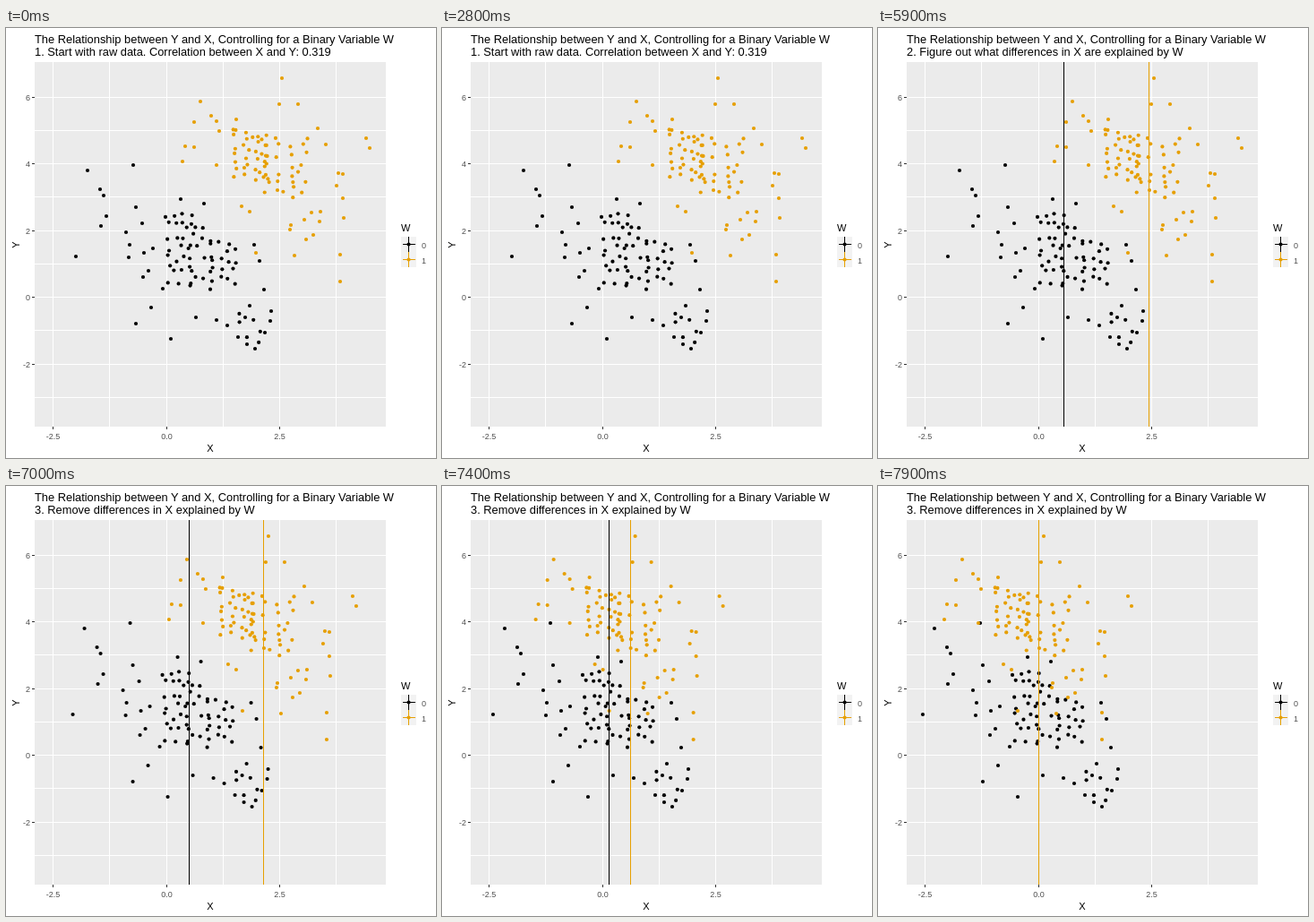
Recreate the animation shown at these times as an HTML page. Size 480 px wide and 480 px high, loop 8 s.

```html
<!DOCTYPE html>
<html lang="en">
<head>
<meta charset="utf-8">
<style>
  html, body { margin: 0; width: 100%; height: 100%; overflow: hidden; background: #fff; }
  svg { display: block; width: 480px; height: 480px; font-family: "Liberation Sans", Arial, sans-serif; }
  .title { font-size: 12.87px; }
  .label { font-size: 11px; }
  .tick { font-size: 9px; fill: #4d4d4d; }
  .mid { text-anchor: middle; }
  .end { text-anchor: end; }
  .line { fill: none; stroke-width: 1; shape-rendering: crispEdges; }
</style>
</head>
<body>
<svg id="plot" viewBox="0 0 480 480"></svg>
<script>
const svg = document.getElementById("plot");
const BLACK = "#000", GOLD = "#e69f00";
const LOOP = 8000, STEP = 100;
const LINES_AT = 4000, MOVE_AT = 6570, MOVE_FOR = 1375;
const CAPTIONS = [
  "1. Start with raw data. Correlation between X and Y: 0.319",
  "2. Figure out what differences in X are explained by W",
  "3. Remove differences in X explained by W"
];

function add(parent, name, attrs, text) {
  const node = document.createElementNS("http://www.w3.org/2000/svg", name);
  for (const key in attrs) node.setAttribute(key, attrs[key]);
  if (text !== undefined) node.textContent = text;
  return parent.appendChild(node);
}
const label = (x, y, kind, text) => add(svg, "text", { x, y, class: kind }, text);
const line = (parent, d, stroke) => add(parent, "path", { d, stroke, class: "line" });
const dot = (parent, x, y, fill) => add(parent, "circle", { cx: x, cy: y, r: 2.1, fill });

let seed = 5;
const random = () => (seed = (seed * 16807) % 2147483647) / 2147483647;

// Evenly spread points with a little jitter inside a box
function scatter(n, left, top, right, bottom) {
  return Array.from({ length: n }, (_, i) => [
    left + (right - left) * ((i * 0.7549 + random() * 0.12) % 1),
    top + (bottom - top) * ((i * 0.5698 + random() * 0.12) % 1)
  ]);
}
const pairs = list => list.flatMap((x, i) => i % 2 ? [] : [[x, list[i + 1]]]);

// Outer points are placed; the dense middles are scattered
const blackPoints = [
  ...pairs([
    91, 159, 78, 255, 105, 180, 109, 187, 106, 221, 112, 210, 134, 228, 142, 153, 145, 200,
    137, 256, 138, 242, 145, 330, 152, 218, 153, 278, 159, 271, 162, 312, 184, 347, 175, 291,
    154, 251, 164, 246, 195, 191, 221, 196, 277, 242, 283, 260, 288, 292, 296, 316, 295, 327,
    289, 340, 272, 310, 267, 323, 259, 345, 278, 358, 269, 353, 247, 332, 235, 326, 212, 323
  ]),
  ...scatter(26, 178, 204, 210, 292),
  ...scatter(15, 201, 219, 233, 298),
  ...scatter(16, 228, 238, 260, 290),
  ...scatter(6, 260, 318, 288, 354)
];
const goldPoints = [
  ...pairs([
    308, 56, 217, 82, 229, 98, 210, 105, 200, 132, 197, 149, 210, 133, 326, 85, 305, 85,
    348, 112, 357, 130, 402, 123, 406, 134, 371, 162, 376, 163, 369, 176, 376, 190, 377, 212,
    373, 253, 373, 283, 322, 254, 279, 251, 343, 231, 335, 236, 351, 205, 350, 216, 333, 214,
    341, 206, 272, 205, 263, 199, 257, 102, 235, 153, 238, 115, 235, 104, 318, 220, 317, 225,
    303, 181
  ]),
  ...scatter(32, 250, 112, 295, 170),
  ...scatter(27, 283, 120, 340, 190)
];

// Panel, grid and axes
add(svg, "rect", { x: 32, y: 38, width: 392, height: 407, fill: "#ebebeb" });
for (let v = -3; v <= 6; v++) {
  const y = Math.round(300 - v * 37.25) + 0.5;
  line(svg, `M32 ${y}H424`, "#fff");
  if (v % 2 === 0) {
    line(svg, `M29 ${y}H32`, "#333");
    label(27, y + 3.5, "tick end", v);
  }
}
for (let i = -2; i <= 3; i++) {
  const x = Math.round(178.6 + i * 63.2) + 0.5;
  line(svg, `M${x} 38V445`, "#fff");
  if (i % 2 === 0) {
    line(svg, `M${x} 445V448`, "#333");
    label(x, 459, "tick mid", (i * 1.25).toFixed(1));
  }
}
label(228, 473, "label mid", "X");
add(svg, "text", { transform: "translate(15 242) rotate(-90)", class: "label mid" }, "Y");
label(32, 17, "title", "The Relationship between Y and X, Controlling for a Binary Variable W");
const caption = label(32, 31, "title", "");

// Legend
label(441, 227, "label", "W");
[BLACK, GOLD].forEach((color, i) => {
  const y = 242 + i * 17;
  add(svg, "rect", { x: 441, y: y - 9, width: 17, height: 17, fill: "#f2f2f2" });
  line(svg, `M449.5 ${y - 9}V${y + 8}M443 ${y - 0.5}H457`, color);
  dot(svg, 449.5, y - 0.5, color);
  label(464, y + 4, "tick", i);
});

// Both groups slide left until their mean sits at zero
const groups = [
  { color: BLACK, points: blackPoints, mean: 207.5 },
  { color: GOLD, points: goldPoints, mean: 302.5 }
];
for (const g of groups) {
  g.dots = add(svg, "g", {});
  g.points.forEach(([x, y]) => dot(g.dots, x, y, g.color));
}
for (const g of groups) g.line = line(svg, `M${g.mean} 38V445`, g.color);

const ease = t => t < 0.5 ? 4 * t ** 3 : 1 - 4 * (1 - t) ** 3;

function draw(now) {
  const time = Math.floor((now % LOOP) / STEP) * STEP;
  const p = ease(Math.min(1, Math.max(0, (time - MOVE_AT) / MOVE_FOR)));
  caption.textContent = CAPTIONS[(time >= LINES_AT) + (time >= MOVE_AT)];
  for (const g of groups) {
    const move = `translate(${(179.5 - g.mean) * p} 0)`;
    g.dots.setAttribute("transform", move);
    g.line.setAttribute("transform", move);
    g.line.setAttribute("visibility", time >= LINES_AT ? "visible" : "hidden");
  }
}

const start = performance.now();
function tick() {
  draw(performance.now() - start);
  requestAnimationFrame(tick);
}
tick();
</script>
</body>
</html>
```
